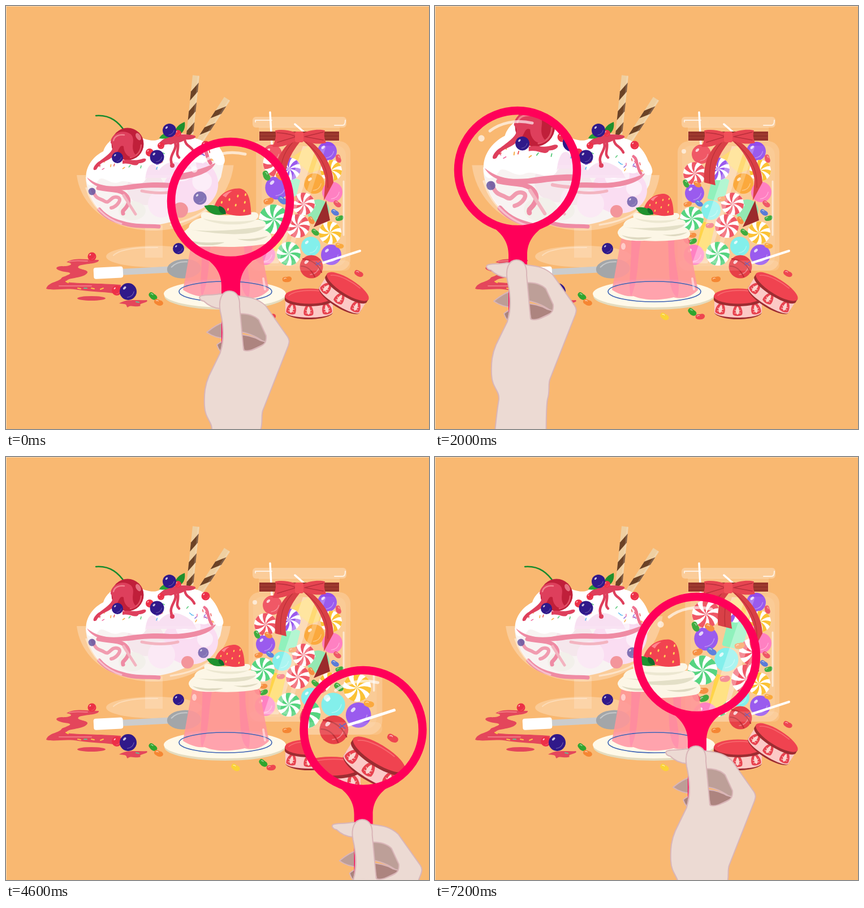
Write an HTML page that moves like this. It is 748 px wide and 748 px high and loops after 7.6 s.

```html
<!DOCTYPE html>
<html lang="en">
<head>
<meta charset="utf-8">
<title>Sweets under the lens</title>
<style>
html, body { margin: 0; width: 100%; height: 100%; overflow: hidden; background: #f9b871; }
svg { display: block; width: 100vw; height: 100vh; }
</style>
</head>
<body>
<svg id="stage" viewBox="0 0 748 748"></svg>
<script>
const BG = '#f9b871', PINK = '#ff0059', SKIN = '#ecdad3', EDGE = '#d9b5b8', SYRUP = '#de3f5c', BERRY = '#30198a';

let seed = 11;
const rnd = () => (seed = seed * 16807 % 2147483647) / 2147483647;

// Shape helpers
const circ = (x, y, r, fill, more = '') => `<circle cx="${x}" cy="${y}" r="${r}" fill="${fill}" ${more}/>`;
const oval = (x, y, rx, ry, fill, rot = 0, more = '') =>
  `<ellipse cx="${x}" cy="${y}" rx="${rx}" ry="${ry}" fill="${fill}" transform="rotate(${rot} ${x} ${y})" ${more}/>`;
const shape = (d, fill, more = '') => `<path d="${d}" fill="${fill}" ${more}/>`;
const line = (d, color, w, more = '') =>
  `<path d="${d}" fill="none" stroke="${color}" stroke-width="${w}" stroke-linecap="round" stroke-linejoin="round" ${more}/>`;
const box = (x, y, w, h, fill, r = 0, more = '') =>
  `<rect x="${x}" y="${y}" width="${w}" height="${h}" rx="${r}" fill="${fill}" ${more}/>`;
const group = (body, move, more = '') => `<g transform="${move}" ${more}>${body}</g>`;
const each = (list, fn) => list.map(a => fn(...a)).join('');
const alpha = o => `opacity="${o}"`;

function ball(x, y, r, fill) {
  return circ(x, y, r, fill) +
    oval(x - r * .42, y - r * .42, r * .22, r * .13, '#fff', -45, alpha(.75)) +
    line(`M${x - r * .1} ${y + r * .68}Q${x + r * .55} ${y + r * .6} ${x + r * .68} ${y}`, '#fff', r * .07, alpha(.35));
}

function bean(x, y, fill, rot = 25, s = 1) {
  return group(
    shape('M-8 -2C-7 -7 -2 -5 1 -4C5 -4 9 -2 8 2C6 7 -1 6 -4 4C-7 3 -9 1 -8 -2Z', fill) +
    line('M-5 -2Q-3 -4 -1 -2', '#fff', 1.2, alpha(.6)),
    `translate(${x} ${y}) rotate(${rot}) scale(${s})`);
}

function mint(x, y, r, fill) {
  let s = circ(0, 0, r, '#fff');
  const at = (a, k) => `${(Math.cos(a) * r * k).toFixed(1)} ${(Math.sin(a) * r * k).toFixed(1)}`;
  for (let i = 0; i < 7; i++) {
    const a = i * Math.PI * 2 / 7, b = a + .46;
    s += shape(`M0 0Q${at(a - .4, .55)} ${at(a, 1)}A${r} ${r} 0 0 1 ${at(b, 1)}Q${at(b - .4, .55)} 0 0Z`, fill);
  }
  return group(s, `translate(${x} ${y})`);
}

function straw(x, y, rot, len) {
  let s = shape(`M-6 0H6V${len}H-6Z`, '#efcfa1');
  for (let y0 = 17; y0 < len - 8; y0 += 35) s += shape(`M6 ${y0 - 5}V${y0 + 11}L-6 ${y0 + 28}V${y0 + 12}Z`, '#6b4226');
  return group(s + box(3, 0, 3, len, '#fff', 0, alpha(.15)), `translate(${x} ${y}) rotate(${rot})`);
}

function halfBerry(x, y, rot) {
  return group(shape('M0 -11C7 -9 10 3 8 8C4 11 -4 11 -8 8C-10 3 -7 -9 0 -11Z', '#e8434f') +
    shape('M0 -7C4 -3 4 6 0 8C-4 6 -4 -3 0 -7Z', '#fbd5cf') +
    line('M0 -5V6M-5 0L-2 2M5 0L2 2M-5 5L-2 5M5 5L2 5', '#fbd5cf', 1),
    `translate(${x} ${y}) rotate(${rot})`);
}

function cake(move) {
  return group(
    shape('M-42 14C-42 22 -20 27 0 27S42 22 42 14V8H-42Z', '#9d2c31') +
    shape('M-42 -8V15C-38 21 -20 24 0 24S38 21 42 15V-8Z', '#fcc9c6') +
    halfBerry(-31, 8, 12) + halfBerry(-1, 11, 0) + halfBerry(31, 8, -12) +
    shape('M-43 -15V-7C-40 0 -20 4 0 4S40 0 43 -7V-15Z', '#9d2c31') +
    oval(0, -14, 43, 13.5, '#f04350') + line('M-36 -15C-25 -25 5 -25 20 -23', '#f86a70', 1.5), move);
}

function sundae() {
  const bowl = 'M125 299H397C390 359 330 397 261 397C190 397 133 360 125 299Z';
  let s = straw(336, 123, 6, 104) + straw(391, 164, 33, 92);
  s += box(246, 388, 31, 57, '#fff', 0, alpha(.18)) + oval(262, 443, 85, 19, '#fff', 0, alpha(.26)) +
    line('M190 441C205 427 245 427 268 427', '#fff', 2, alpha(.3));
  s += shape(bowl, '#fff', alpha(.2));
  // Scoops
  s += shape('M141 302C142 340 168 378 215 388C268 396 352 374 379 316L384 292Z', '#f7f2f0');
  s += oval(326, 326, 49, 41, '#f9d9f0') + oval(247, 322, 33, 30, '#f4e4ea') + circ(275, 350, 24, '#fae6f4') +
    oval(223, 362, 24, 17, '#f0eee8') + circ(322, 300, 22, '#fff', alpha(.6)) + circ(352, 322, 14, '#fff', alpha(.5));
  s += shape('M142 306C139 285 155 265 172 257C178 238 199 224 226 229C247 235 257 241 270 236C287 224 319 222 335 234C356 239 371 256 377 274C386 287 388 300 376 299C367 298 370 286 361 290C351 304 340 287 330 299C310 317 300 291 285 296C266 301 257 290 246 308C236 324 215 305 201 311C186 318 175 301 165 306C154 323 142 319 142 306Z', '#fff');
  s += shape('M246 307C249 278 260 272 270 291C280 277 300 266 330 291L337 304H248Z', '#f8e0f2');
  // Ripples
  s += shape('M143 303C162 318 180 320 205 318C240 312 265 311 290 313C320 314 348 306 371 296C366 309 342 318 312 321C280 323 262 319 232 323C195 329 156 326 143 303Z', '#ed7e9a') +
    line('M163 322C177 325 177 324 198 327C214 331 220 342 215 352S205 360 207 367', '#ed7e9a', 7) +
    line('M153 325C160 344 165 339 174 345C184 351 184 336 196 338S196 355 186 357', '#ef91a7', 6) +
    line('M165 360C180 378 200 382 215 386C235 391 252 388 270 390', '#ed7e9a', 7) +
    line('M208 335L229 368M240 327Q275 334 304 327', '#f2abb9', 5);
  s += circ(152, 328, 6.5, '#554397', alpha(.85)) + ball(349, 346, 9.5, '#7562ac') + circ(321, 363, 11, '#f18990');
  // Sprinkles
  const tints = ['#f06fa0', '#f8a93d', '#8b68dc', '#56c97a', '#ee5252', '#58b8ef'];
  for (let i = 0; i < 40; i++) {
    const u = rnd(), x = 164 + u * 198, y = 288 - 32 * rnd() * Math.sin(.5 + u * 2.2), a = rnd() * 3.14;
    s += line(`M${x.toFixed(1)} ${y.toFixed(1)}l${(4 * Math.cos(a)).toFixed(1)} ${(4 * Math.sin(a)).toFixed(1)}`, tints[i % 6], 1.5);
  }
  // Cherry and toppings
  s += line('M159 194C185 192 200 206 211 223', '#178b2c', 2.4) + circ(215, 244, 28.5, '#c01f3a') +
    oval(234, 231, 4, 7, '#ef8694', -30, alpha(.8)) + line('M220 268Q238 264 239 246', '#e25367', 2.5);
  s += shape('M185 242C185 225 208 216 221 227C231 238 217 250 230 264C219 273 208 261 208 248C199 243 200 262 188 267C176 277 168 274 160 289C150 294 155 280 166 274C180 263 196 253 185 242Z', SYRUP) +
    line('M190 238C192 229 201 227 209 228', '#f1808e', 2.5) +
    shape('M206 273C220 269 224 276 242 270C252 268 248 278 235 278C230 287 220 276 206 279Z', SYRUP);
  s += shape('M268 247C275 233 296 224 328 228C345 230 329 238 317 236C308 244 301 240 292 245C280 242 274 251 268 247Z', SYRUP) +
    line('M298 239C306 255 285 262 294 282M316 236C318 249 328 247 333 259M304 242C306 255 299 261 306 268', SYRUP, 4.5) +
    circ(294, 282, 4, SYRUP) + line('M351 266C359 271 355 282 364 296', '#ee7290', 5);
  s += shape('M298 228C299 213 307 209 316 205C318 218 312 229 298 228Z', '#1f8f2d') +
    shape('M271 234C276 224 286 223 294 226C290 234 280 236 271 234Z', '#28a236');
  s += each([[254, 259, 7], [274, 247, 6], [304, 225, 6], [353, 246, 7.5]], (x, y, r) => ball(x, y, r, '#ed3048')) +
    each([[289, 220, 12], [267, 267, 12.5], [197, 268, 10]], (x, y, r) => ball(x, y, r, BERRY));
  s += shape(bowl, '#fff', alpha(.1)) +
    line('M142 322C151 352 176 377 204 385M291 387C324 382 347 373 367 356', '#fff', 3, alpha(.45));
  return s;
}

function spill() {
  let s = shape('M107 453C122 444 143 449 164 449C165 456 143 455 130 459C118 466 151 465 143 473C133 483 108 479 106 488C128 491 166 490 203 493V510C177 505 154 506 128 502C105 498 85 504 71 500C75 487 94 489 99 480C111 475 122 472 104 470C86 467 85 461 98 460C111 461 124 456 107 453Z', '#e4465b') +
    line('M112 452C123 449 133 451 144 451M94 495H151', '#f27881', 2) +
    oval(151, 517, 25, 4, '#e4465b') + shape('M200 526C214 517 231 521 249 520C254 525 233 525 238 530C228 534 221 527 215 533C211 529 217 527 200 526Z', '#e4465b') +
    line('M127 499l5 1M151 499l5 1M167 501l5 -2M106 487l4 2', '#f9c74a', 2) + line('M138 499l5 0M230 523l5 1', '#69bd91', 2);
  s += ball(152, 443, 7.5, '#ec3046') + ball(196, 503, 9, '#ed3048') + ball(216, 505, 15, BERRY) + ball(305, 429, 10, BERRY);
  s += group(box(48, -5.5, 88, 11, '#cbcccd', 3) + box(0, -10, 52, 20, '#fff', 4) + oval(160, 0, 30, 17, '#a3a6a9') +
    line('M138 -4Q148 -14 166 -12', '#c6c8ca', 2), 'translate(155 473) rotate(-3)');
  return s + bean(260, 513, '#2fa52f') + bean(270, 524, '#f58633', 10);
}

function jar() {
  const red = '#ef4a59', gold = '#fbbd25', green = '#48d075', violet = '#914dec', cyan = '#78eee9', pink = '#ff75bd', orange = '#fba22c';
  let s = box(436, 196, 166, 19, '#fff', 6, alpha(.28)) + box(447, 214, 143, 26, '#fff', 0, alpha(.14)) + box(429, 239, 180, 229, '#fff', 20, alpha(.2));
  s += line('M467 188L471 262M511 209L544 238', '#fff', 3.5);
  s += box(467, 383, 23, 50, '#ffd039', 2, 'transform="rotate(13 478 408)"') + shape('M505 268L537 246L558 288L538 296Z', '#ffd667') +
    box(486, 303, 30, 42, '#86f0b6', 3, 'transform="rotate(14 501 324)"');
  s += each([[471, 262, 17, red], [568, 257, 17, violet], [545, 314, 18, orange], [577, 329, 18, pink], [459, 331, 17, violet],
    [488, 361, 17, cyan], [552, 362, 20, '#8be6ad'], [458, 440, 18, pink], [539, 425, 17, cyan], [575, 440, 18, violet]], ball);
  s += each([[459, 296, 20, red], [501, 288, 20, violet], [575, 291, 19, gold], [526, 350, 20, red], [454, 376, 21, green],
    [516, 389, 21, red], [573, 401, 20, gold], [500, 438, 21, green]], mint);
  s += each([[444, 314, '#2fa52f', 50], [464, 315, '#f58633', 20], [447, 350, '#f58633', -30], [467, 349, '#5177d9', 20], [588, 270, red, 60], [582, 365, '#4b70d5', 20],
    [590, 375, '#2fa52f', -30], [590, 424, orange, 0], [455, 405, '#f58633', -15], [456, 416, '#2fa52f', -35], [486, 388, red, -20], [540, 379, '#f58633', 45],
    [507, 341, '#f58633', -25], [547, 400, '#2fa52f', 25], [586, 350, red, 25], [445, 414, red, 40]], (x, y, f, r) => bean(x, y, f, r, .9));
  // Glass glints
  s += shape('M525 248H549L482 455H455Z', '#fff', alpha(.32)) + shape('M558 248H566L499 455H490Z', '#fff', alpha(.22)) +
    line('M441 205V202H470M581 211H595Q600 211 600 202', '#fff', 2, alpha(.7)) + line('M597 310V405', '#fff', 3, alpha(.55)) +
    box(437, 247, 164, 213, '#fff', 16, alpha(.08)) + circ(440, 257, 4, '#fff', alpha(.6));
  // Ribbon
  s += box(448, 222, 141, 16, '#96332b') + line('M449 227H588M449 233H588', '#ae4536', 1);
  s += shape('M507 236C488 252 473 274 476 312L496 317C490 286 503 261 520 240Z', '#d94047') +
    shape('M522 236C541 249 559 277 565 306L562 344L579 312C579 283 558 252 535 237Z', '#d94047') +
    shape('M566 344L544 391L573 379Z', '#9b2b2c') + line('M507 241C487 263 484 286 486 313M530 241C557 263 571 289 569 321', '#ba3038', 1.2);
  s += shape('M516 226C502 218 485 218 476 220C479 231 475 241 471 249C488 251 502 244 516 237Z', '#e64451') +
    shape('M522 226C537 219 553 217 564 220C561 229 564 236 566 242C549 246 536 242 522 236Z', '#e64451') +
    line('M479 224Q500 225 513 231L480 241M561 223L528 231L561 237', '#ba303c', 1.5) + box(511, 222, 15, 19, '#f15058', 3);
  s += line('M555 456L626 433', '#fff', 4) + ball(540, 461, 20.5, '#e74047') + line('M525 447Q549 450 558 471M522 460Q537 460 546 479', '#bc3037', 2) +
    line('M548 453l8 6M548 458l9 -6', '#5750b5', 1.5);
  return s + box(429, 450, 180, 18, '#fff', 9, alpha(.12)) + bean(497, 483, '#f58633', -20) + bean(624, 473, '#ee4650', 15);
}

function pudding() {
  const jelly = 'M330 407L313 502C328 511 339 514 351 513C373 522 402 520 422 515C439 520 456 512 465 502L447 407Z';
  let s = oval(387, 513, 107, 24, '#e4dcbf') + oval(387, 509, 108, 24, '#fff9e9');
  s += shape(jelly, '#ff989a', alpha(.88)) +
    shape('M347 407H366C356 448 362 478 347 513C340 507 349 439 347 407Z', '#ff83a5', alpha(.6)) +
    shape('M411 407H424C419 449 437 483 429 515C409 506 416 450 411 407Z', '#ff83a5', alpha(.6)) +
    shape('M317 487Q388 478 461 487L465 502C456 512 439 520 422 515C402 520 373 522 351 513C339 514 328 511 313 502Z', '#ff9fd0', alpha(.2)) +
    oval(388, 505, 82, 18, 'none', 0, 'stroke="#3e64b5" stroke-width="1.6"') +
    oval(333, 425, 4, 6, '#fff', 0, alpha(.5)) + line('M455 482L458 501', '#fff', 4, alpha(.5));
  // Cream
  s += shape('M324 404C320 397 330 391 333 388C334 380 343 376 351 374C348 367 356 364 362 367C380 373 405 370 424 366C432 365 436 372 428 377C443 376 447 383 439 391C452 393 456 408 444 411C430 414 400 417 370 415C345 416 327 414 324 404Z', '#fcf6e6') +
    shape('M335 391C367 395 409 391 442 386C433 399 395 401 335 391Z', '#e3dfc7') + shape('M353 375C376 380 404 381 429 377C411 387 371 385 353 375Z', '#ece7d1') +
    shape('M330 405C354 412 370 408 384 409C368 416 341 414 330 405ZM402 404C419 406 434 402 446 400C435 408 417 409 402 404Z', '#ded9c1') +
    line('M345 388C378 391 402 386 425 384', '#fcf6e6', 3);
  s += shape('M369 359C374 342 388 332 405 332C418 334 421 347 422 369C403 374 385 370 369 359Z', '#f24350') + shape('M381 342Q389 335 395 336Q389 339 386 345Z', '#ff858b');
  s += each([[391, 348], [403, 343], [413, 352], [400, 356], [389, 362], [412, 364], [380, 352], [414, 341]], (x, y) => oval(x, y, 1.2, 2, '#ffd456', 15));
  s += shape('M355 357C367 354 379 356 384 369C371 372 361 368 355 357Z', '#1f922f') + shape('M376 357Q386 359 386 369Q374 368 376 357Z', '#116d2a');
  return s + bean(406, 549, '#fbd237', 20) + bean(455, 541, '#2fa52f') + bean(469, 549, '#ee4650', -20);
}

const scene = box(0, 0, 748, 748, BG) + sundae() + spill() + jar() + pudding() +
  cake('translate(536 527)') + cake('translate(597 508) rotate(32)');

// Parts below are placed around the centre of the lens
const rim = `stroke="${EDGE}" stroke-width="2" stroke-linejoin="round"`;
const backHand = shape('M-42 232C-30 222 -20 216 -8 213V243Q-28 242 -42 232Z', '#bd9d96', rim) +
  shape('M-24 254Q-15 246 -8 247V267Q-18 272 -24 254Z', '#a9837d', rim) +
  shape('M10 196L55 204L70 246L60 250C46 239 30 232 10 230Z', '#bd9f98', rim) +
  shape('M10 236C28 236 42 240 52 246L66 250L24 270L10 264Z', '#ad847f', rim);
const grip = shape('M-48 98C-27 112 -16 128 -16 150V257L4 262L17 234V150C17 128 28 112 49 98Z', PINK);
const ring = `<circle r="105" fill="none" stroke="${PINK}" stroke-width="14.5"/>` +
  circ(-64, -56, 5.7, '#fff', alpha(.65)) + line('M-49 -69C-31 -83 -3 -90 26 -83', '#fff', 5, alpha(.65));
const palm = 'M-53 168C-48 165 -34 167 -19 164L17 168C35 170 48 172 62 185L101 240C105 246 104 250 102 256L58 368C53 378 58 390 53 405C50 420 50 490 52 520L55 620H-47L-44 520C-42 480 -37 430 -33 405C-32 390 -45 385 -46 362C-47 340 -45 325 -38 309L-18 268C-13 250 -11 225 -18 190C-32 189 -40 184 -47 177C-54 176 -57 170 -53 168Z';
const gap = 'M17 199C30 199 42 202 50 210L63 238C64 250 60 254 48 259C40 263 30 266 24 264C20 250 18 230 17 199Z';
// The grip stays in view between the fingers and the thumb
const frontHand = shape(palm + gap, SKIN, `fill-rule="evenodd" ${rim}`) +
  shape('M-18 195C-22 174 -15 159 -2 159C12 159 17 172 16 186L23 263L-17 264C-12 248 -11 225 -18 195Z', SKIN) +
  line('M-17 264C-12 248 -11 225 -18 195C-22 174 -15 159 -2 159C12 159 17 172 16 186L23 263', EDGE, 2);

document.getElementById('stage').innerHTML =
  `<defs><clipPath id="glass"><circle id="hole" r="100"/></clipPath></defs>
  <g id="scene">${scene}</g>
  <g clip-path="url(#glass)"><use href="#scene" transform="translate(374 372) scale(1.24) translate(-374 -372)"/></g>
  <g id="tool">${backHand + grip + ring + frontHand}</g>` +
  box(0, 0, 748, 1, '#fbdcb6') + box(0, 0, 1, 748, '#fbdcb6');

// Wandering path: step, x, y
const LOOP = 7600, STEP = 200, LAST = 36;
const keys = [
  [0, 397, 345], [1, 416, 300], [3, 372, 192], [4, 325, 177], [6, 252, 216], [7, 238, 190], [8, 200, 193],
  [10, 146, 290], [11, 137, 370], [12, 140, 453], [13, 111, 510], [14, 175, 521], [16, 320, 530], [17, 420, 500],
  [18, 402, 453], [19, 466, 526], [21, 600, 545], [22, 640, 510], [24, 602, 453], [26, 473, 380], [27, 485, 356],
  [29, 560, 300], [30, 590, 287], [31, 609, 241], [32, 590, 215], [34, 480, 270], [35, 418, 325], [36, 463, 352]
];

function slope(i, k) {
  const a = keys[Math.max(i - 1, 0)], b = keys[Math.min(i + 1, keys.length - 1)];
  return (b[k] - a[k]) / (b[0] - a[0]);
}

function place(n) {
  let i = 0;
  while (i < keys.length - 2 && keys[i + 1][0] <= n) i++;
  const a = keys[i], b = keys[i + 1], span = b[0] - a[0], u = (n - a[0]) / span, v = 1 - u;
  return [1, 2].map(k => v * v * (1 + 2 * u) * a[k] + u * u * (3 - 2 * u) * b[k] +
    span * u * v * (v * slope(i, k) - u * slope(i + 1, k)));
}

const tool = document.getElementById('tool'), hole = document.getElementById('hole');

function draw(ms) {
  const [x, y] = place(Math.min(Math.floor(ms % LOOP / STEP), LAST));
  tool.setAttribute('transform', `translate(${x} ${y})`);
  hole.setAttribute('cx', x);
  hole.setAttribute('cy', y);
}

const start = performance.now();
function tick() {
  draw(performance.now() - start);
  requestAnimationFrame(tick);
}
tick();
</script>
</body>
</html>
```
